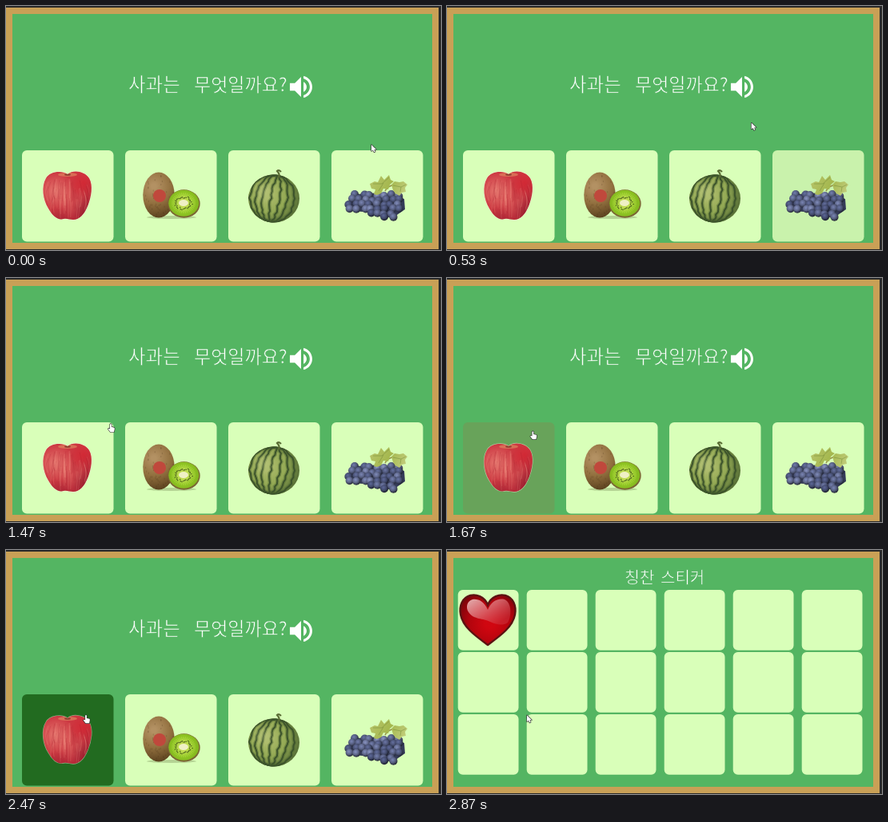
Write an HTML page with a canvas that moves like this. It is 544 px wide and 306 px high and loops after 2.99 s.

```html
<!DOCTYPE html>
<html lang="ko">
<head>
<meta charset="utf-8">
<style>
html, body { margin: 0; width: 100%; height: 100%; overflow: hidden; background: #2a2a2a; }
canvas { display: block; }
</style>
</head>
<body>
<canvas id="stage" width="544" height="306"></canvas>
<script>
const ctx = document.getElementById('stage').getContext('2d');
const LOOP = 2990, FPS = 15, BOARD_AT = 2600;
const GREEN = '#54b562', CARD = [217, 255, 185], CARD_HOVER = [34, 107, 32];
const FONT = '"Noto Sans CJK KR", "Noto Sans KR", "Noto Sans", sans-serif';
const TAU = Math.PI * 2;

// Keyframes: time followed by values, joined by straight segments.
const POINTER = [[200, 457, 174], [270, 452, 180], [330, 447, 183], [400, 434, 183],
  [470, 410, 170], [530, 381, 148], [600, 374, 118], [670, 372, 104], [1200, 372, 103],
  [1270, 352, 112], [1400, 190, 166], [1470, 128, 184], [1670, 107, 192.5], [1930, 100, 207.3]];
const GRAPE_HOVER = [[265, 0], [330, .13], [400, .42], [420, .45], [470, .3], [530, .09], [640, 0]];
const APPLE_HOVER = [[1470, 0], [1535, .15], [1600, .4], [1667, .62], [1735, .78], [1800, .88], [1970, 1]];
const SPEAKER_HOVER = [[590, 0], [730, 1], [1260, 1], [1400, 0]];
const HEART_FADE = [[2550, 0], [2867, 1]];

function at(keys, t) {
  if (t <= keys[0][0]) return keys[0].slice(1);
  const i = keys.findIndex(k => k[0] > t);
  if (i < 0) return keys[keys.length - 1].slice(1);
  const a = keys[i - 1], b = keys[i], u = (t - a[0]) / (b[0] - a[0]);
  return a.slice(1).map((v, n) => v + (b[n + 1] - v) * u);
}

const rand = n => { const v = Math.sin(n * 12.9898) * 43758.5453; return v - Math.floor(v); };
const mix = (a, b, u) => `rgb(${a.map((v, i) => Math.round(v + (b[i] - v) * u))})`;

function fill(color, path) { ctx.fillStyle = color; ctx.fill(path); }
function stroke(color, width, path) { ctx.strokeStyle = color; ctx.lineWidth = width; ctx.stroke(path); }
function oval(x, y, rx, ry = rx, turn = 0) {
  const p = new Path2D();
  p.ellipse(x, y, rx, ry, turn, 0, TAU);
  return p;
}
function box(x, y, size, color) {
  const p = new Path2D();
  p.roundRect(x, y, size, size, 6);
  fill(color, p);
}
function withStops(gradient, colors) {
  colors.forEach((c, i) => gradient.addColorStop(i / (colors.length - 1), c));
  return gradient;
}
const radial = (x, y, r0, r1, ...colors) => withStops(ctx.createRadialGradient(x, y, r0, x, y, r1), colors);
const linear = (x0, y0, x1, y1, ...colors) => withStops(ctx.createLinearGradient(x0, y0, x1, y1), colors);
const glow = (x, y, r, rgb, alpha) => fill(radial(x, y, 0, r, `rgba(${rgb},${alpha})`, `rgba(${rgb},0)`), oval(x, y, r));

function clipped(path, draw) {
  ctx.save();
  ctx.clip(path);
  draw();
  ctx.restore();
}

// A thin outline in the board colour slims the letters to chalk weight.
function chalk(words, x, y, size) {
  ctx.font = `100 ${size}px ${FONT}`;
  ctx.fillStyle = '#fff';
  ctx.fillText(words, x, y);
  ctx.strokeStyle = GREEN;
  ctx.lineWidth = .6;
  ctx.strokeText(words, x, y);
}

const appleShape = new Path2D('M77 211C70 206 55 207 50 216C44 226 46 243 53 254C58 263 65 269 72 267C76 266 80 268 84 268C92 268 98 261 102 251C107 239 109 225 104 216C98 207 84 205 77 211Z');
const speakerShape = new Path2D('M3 9v6h4l5 5V4L7 9H3zm13.5 3c0-1.77-1.02-3.29-2.5-4.03v8.05c1.48-.73 2.5-2.25 2.5-4.02zM14 3.23v2.06c2.89.86 5 3.54 5 6.71s-2.11 5.85-5 6.71v2.06c4.01-.91 7-4.49 7-8.77s-2.99-7.86-7-8.77z');
const heartShape = new Path2D('M51 69C47 58 36 55 29 57C19 60 15 70 17 81C20 97 36 108 51 119C66 108 82 97 85 81C87 70 83 60 73 57C66 55 55 58 51 69Z');
const glossShape = new Path2D('M51 75C46 64 39 61 32 62C25 64 23 72 27 78C34 88 45 85 54 90C62 94 70 95 76 91C81 83 81 66 72 62C63 60 55 65 51 75Z');
const leavesShape = new Path2D('M455 223l6-3 4 1 4-8 4 5 6-6 2 6 4 2-5 4-2 6-6-1-3 6-5 2-4-1 2-6-5-1ZM482 224l4-4 6 1 5-1 5 4-3 4 1 5-5 1-3 4-5-3-3-4Z');
const arrowShape = new Path2D('M0 0V8L1.9 6.4 3.3 9.3 4.7 8.6 3.4 5.9H6Z');
const handShape = new Path2D('M-.9 .3Q0-.7 .9 .3V3.6L4.4 4.5Q5 5 4.8 6.5L4 10H-.4L-3.2 6.3Q-2.6 4.9-.9 6Z');

function drawApple() {
  stroke('rgba(255,240,225,.5)', 1.3, appleShape);
  fill(linear(48, 215, 98, 268, '#cb3540', '#cd3a42', '#ad2334'), appleShape);
  clipped(appleShape, () => {
    glow(62, 232, 24, '246,160,140', .6);
    glow(83, 247, 20, '235,120,110', .4);
    glow(97, 222, 18, '215,25,40', .5);
    glow(103, 258, 20, '120,15,35', .5);
    glow(62, 272, 20, '130,20,40', .45);
    for (let i = 0; i < 50; i++) {
      const u = rand(i) * 2 - 1, y = 216 + rand(i + 70) * 28;
      const p = new Path2D();
      p.moveTo(77 + u * 24, y);
      p.quadraticCurveTo(77 + u * 30, y + 12, 77 + u * 25, y + 24);
      stroke(i % 2 ? 'rgba(250,185,160,.16)' : 'rgba(150,15,35,.16)', 1, p);
    }
    fill('rgba(225,145,100,.6)', oval(77, 211.5, 12, 2.5));
    fill('rgba(90,25,20,.55)', oval(77, 211.5, 4, 1.3));
  });
}

function drawKiwi() {
  fill('rgba(95,110,60,.3)', oval(207, 265, 31, 2));
  const whole = oval(191, 237, 19.7, 28.5);
  fill(radial(185, 226, 3, 40, '#b39163', '#92703f', '#5c421f'), whole);
  clipped(whole, () => {
    for (let i = 0; i < 70; i++) {
      fill('rgba(70,46,20,.2)', oval(171 + rand(i) * 41, 209 + rand(i + 99) * 56, .6, 1.3));
    }
  });
  fill('#c0483c', oval(192, 238, 8));
  fill('#7b6434', oval(222.5, 248, 20.2, 17.7));
  fill(radial(222, 247, 4, 20, '#c3dc50', '#92c824', '#7fb31d'), oval(222.3, 247.2, 19, 16.5));
  for (let i = 0; i < 36; i++) {
    const a = i / 36 * TAU, c = Math.cos(a), s = Math.sin(a);
    const ray = new Path2D();
    ray.moveTo(222 + c * 6, 247 + s * 5);
    ray.lineTo(222 + c * 15, 247 + s * 13);
    stroke('rgba(215,235,120,.4)', .7, ray);
    const r = .85 + rand(i) * .4;
    fill('rgba(45,60,15,.85)', oval(222 + c * 9.2 * r, 247 + s * 7 * r, .75));
  }
  fill('#eff0c4', oval(222, 247, 6, 4));
}

function drawMelon() {
  const skin = oval(335, 241.5, 32, 30);
  fill(radial(327, 236, 6, 40, '#a9b968', '#93a954', '#5b7338'), skin);
  clipped(skin, () => {
    ctx.translate(335, 241.5);
    ctx.rotate(.17);
    [-.95, -.72, -.44, -.12, .22, .52, .8].forEach((u, n) => {
      const stripe = new Path2D();
      for (let i = 0; i <= 22; i++) {
        const a = -Math.PI / 2 + i / 22 * Math.PI;
        stripe.lineTo(32 * u * Math.cos(a) + rand(n * 30 + i) * 2.4 - 1.2, 30 * Math.sin(a));
      }
      stroke('rgba(70,95,45,.4)', 4.5, stripe);
      stroke('#3b522b', 1.9, stripe);
    });
  });
  glow(322, 233, 15, '205,215,150', .3);
  stroke('#5b6d35', 2.2, new Path2D('M341 215Q343 211 339 207Q341 205 344 208'));
}

function drawGrapes() {
  fill('#343b58', new Path2D('M428 246L438 236 470 234 498 242 499 255 486 264 460 259 432 257Z'));
  const rows = [[237, 438, 494], [243, 432, 500], [249, 428, 498], [255, 431, 495], [260, 456, 489], [264, 474, 484]];
  rows.forEach(([y, left, right], row) => {
    for (let x = left, i = row * 20; x <= right; x += 8.8, i++) {
      const gx = x + rand(i) * 4 - 2, gy = y + rand(i + 7) * 3 - 1.5;
      const tone = 65 + rand(i + 33) * 38;
      const color = shade => `rgb(${tone * shade},${(tone + 8) * shade},${(tone + 42) * shade})`;
      fill(radial(gx - 1, gy - 1.5, .5, 6.5, color(1.35), color(1), color(.4)), oval(gx, gy, 5));
    }
  });
  stroke('#98934b', 1.6, new Path2D('M474 232Q480 222 489 226'));
  fill(linear(455, 213, 502, 238, '#b8c56b', '#a5b84f', '#c6d083'), leavesShape);
  stroke('rgba(105,130,50,.55)', .8, new Path2D('M459 223L470 223 479 215M466 232L472 222M484 225L494 227 500 224M494 227L493 233'));
}

function drawHeart(alpha) {
  ctx.save();
  ctx.globalAlpha = alpha;
  fill(radial(54, 92, 6, 46, '#d00610', '#b3040d', '#73040a'), heartShape);
  stroke('#5c1212', 2.4, heartShape);
  fill(linear(35, 60, 58, 96, 'rgba(240,190,190,.85)', 'rgba(226,125,130,.7)', 'rgba(210,70,80,.4)'), glossShape);
  ctx.restore();
}

function drawFrame() {
  [['#2a2a2a', 0, 0, 544, 306], ['#c9a056', 0, 2, 541, 303], [GREEN, 8, 10, 525, 287]]
    .forEach(([color, ...rect]) => { ctx.fillStyle = color; ctx.fillRect(...rect); });
}

function drawQuestion(t) {
  chalk('사과는', 153, 107, 23.5);
  chalk('무엇일까요?', 235, 107, 23);
  fill(`rgba(0,0,0,${.07 * at(SPEAKER_HOVER, t)[0]})`, oval(370, 101.5, 19));
  ctx.save();
  ctx.translate(350.3, 82.8);
  ctx.scale(1.556, 1.556);
  fill('#fff', speakerShape);
  ctx.restore();

  const hover = [at(APPLE_HOVER, t)[0], 0, 0, at(GRAPE_HOVER, t)[0]];
  hover.forEach((h, i) => box(20 + i * 129, 181, 114.5, mix(CARD, CARD_HOVER, h)));
  drawApple();
  drawKiwi();
  drawMelon();
  drawGrapes();
}

function drawBoard(t) {
  chalk('칭찬', 222, 42, 20.5);
  chalk('스티커', 267, 42, 20);
  for (let i = 0; i < 18; i++) {
    box(13.7 + i % 6 * 86, 50 + Math.floor(i / 6) * 78, 75.8, `rgb(${CARD})`);
  }
  drawHeart(at(HEART_FADE, t)[0]);
}

function drawPointer(t) {
  const [x, y] = at(POINTER, t);
  const overCard = y >= 181 && (x - 20) % 129 < 115;
  const overSpeaker = Math.hypot(x - 370, y - 101.5) < 19;
  const shape = t < BOARD_AT && (overCard || overSpeaker) ? handShape : arrowShape;
  ctx.save();
  ctx.translate(x, y);
  ctx.lineJoin = 'round';
  stroke('#333', 1.3, shape);
  fill('#fff', shape);
  ctx.restore();
}

function render(now) {
  const step = Math.floor((now % LOOP + 4) * FPS / 1000);
  const t = step * 1000 / FPS;
  drawFrame();
  if (t < BOARD_AT) drawQuestion(t);
  else drawBoard(t);
  drawPointer(t);
}

const start = performance.now();
function tick() {
  render(performance.now() - start);
  requestAnimationFrame(tick);
}
tick();
</script>
</body>
</html>
```
